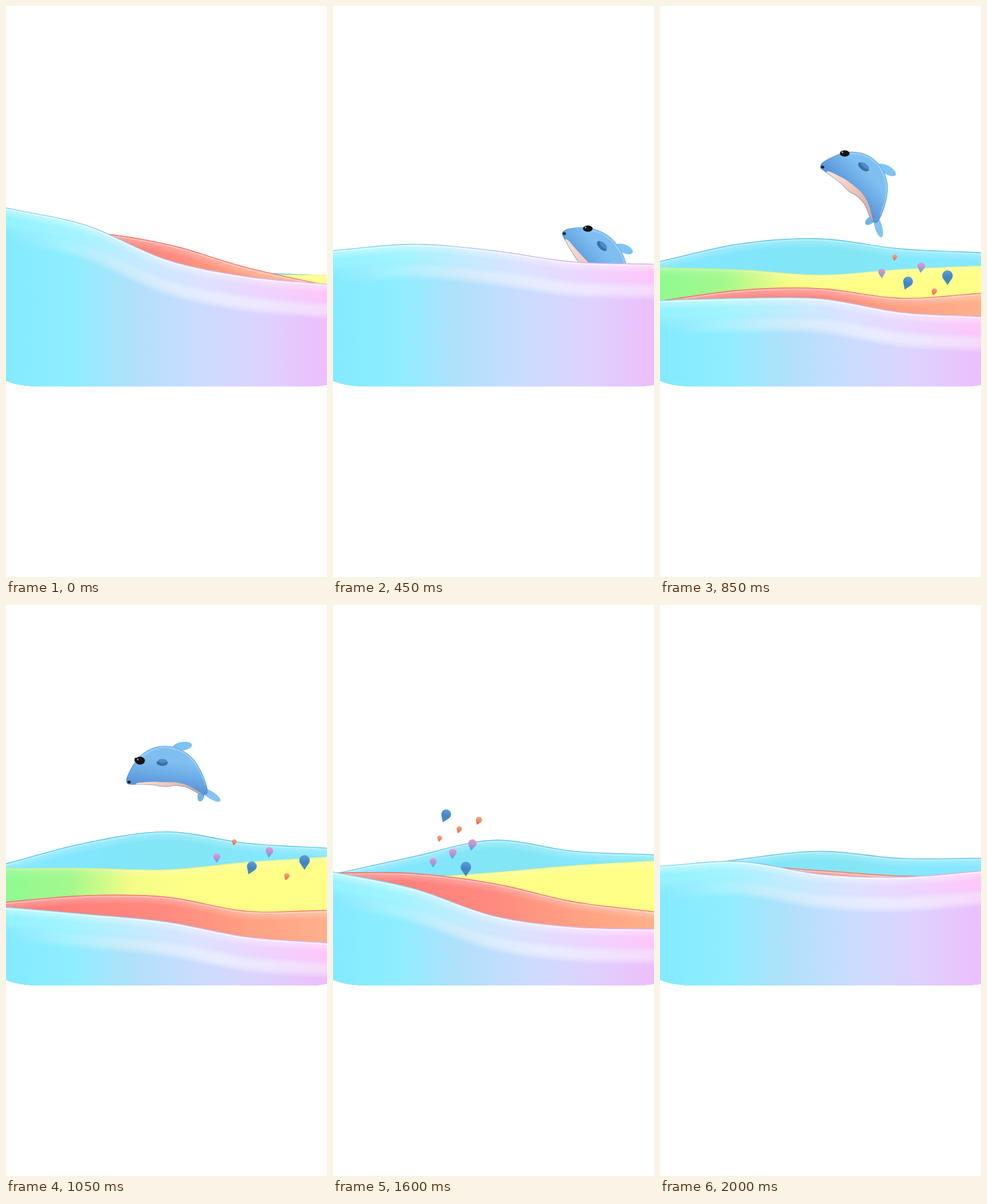
An HTML page with a canvas that plays this animation: 561x998 px, repeating every 2.05 s.

```html
<!DOCTYPE html>
<html lang="en">
<head>
<meta charset="utf-8">
<title>Dolphin over rainbow waves</title>
<style>
html, body { margin: 0; width: 100%; height: 100%; overflow: hidden; background: #fff; }
canvas { display: block; }
</style>
</head>
<body>
<canvas id="stage" width="561" height="998"></canvas>
<script>
const ctx = document.getElementById('stage').getContext('2d');
const W = 561, LOOP = 2050, STEP = 50, TIDE = 1900;
const { PI, sin, cos, atan2, hypot } = Math;

const clamp = (v, lo, hi) => Math.max(lo, Math.min(hi, v));
const mix = (a, b, k) => a + (b - a) * k;
const fract = v => v - Math.floor(v);
const ease = (t, from, to) => {
  const k = clamp((t - from) / (to - from), 0, 1);
  return k * k * (3 - 2 * k);
};

// Evenly spaced colours from one point to another.
function gradient(x0, y0, x1, y1, colors) {
  const g = ctx.createLinearGradient(x0, y0, x1, y1);
  colors.forEach((color, i) => g.addColorStop(i / (colors.length - 1), color));
  return g;
}
const across = (...colors) => gradient(0, 0, W, 0, colors);

// Smooth path through points.
function curve(pts, closed) {
  const path = new Path2D(), n = pts.length;
  const beyond = (p, q) => [2 * p[0] - q[0], 2 * p[1] - q[1]];
  const at = i => {
    if (closed) return pts[(i + n) % n];
    if (i < 0) return beyond(pts[0], pts[1]);
    return i < n ? pts[i] : beyond(pts[n - 1], pts[n - 2]);
  };
  path.moveTo(...pts[0]);
  for (let i = 0; i < (closed ? n : n - 1); i++) {
    const p = at(i - 1), a = at(i), b = at(i + 1), q = at(i + 2);
    path.bezierCurveTo(
      a[0] + (b[0] - p[0]) / 6, a[1] + (b[1] - p[1]) / 6,
      b[0] - (q[0] - a[0]) / 6, b[1] - (q[1] - a[1]) / 6, ...b);
  }
  return path;
}

// Each wave bobs at its left, middle and right: mean height, drift per second,
// swing and the time of its lowest crest. The bend adds a fixed S shape.
const cyan = {
  left: [455, 2, -12, 720], middle: [425, -8, -22, 1150], right: [456, -15, -16, 1050], bend: -6,
  base: across('#84e8ff', '#82e6ff', '#82e6f8', '#84e6f4', '#84e8ff', '#86e8ff'),
  edge: '#58b4e0', shine: .35
};
const yellow = {
  left: [463, 2, -8, 760], middle: [468, 4, -14, 1290], right: [458, 0, -24, 1270], bend: 2,
  base: across('#90fa92', '#a4f88c', '#f6fd86', '#ffff88', '#ffff88', '#ffff88'),
  edge: '#e4f080', shine: .2
};
const red = {
  left: [440, 35.5, 45.7, 914], middle: [447, 26, 36, 1104], right: [503, 0, 51, 1334], bend: -9,
  base: across('#ff7c78', '#ff827c', '#ff8a80', '#ffa082', '#ffb08a'),
  edge: '#e8705c', shine: .4
};
const front = {
  left: [414, 51, 62, 975], middle: [478, 22, 68, 1261], right: [527, 0, 84, 1270], bend: -8,
  lit: across('#94f2ff', '#a2f4ff', '#c2ecff', '#dee2ff', '#eed4ff', '#ffc6fa'),
  base: across('#82e8ff', '#8cecff', '#b0def8', '#c9daff', '#dcd0ff', '#ebbcff'),
  glow: across('#ffffff00', '#ffffff18', '#ffffff28', '#ffffff20'),
  edge: across('#7cc8f0', '#8cb4ec', '#c4a4e4', '#d4a0e0'), shine: .6
};

function crestPoint(wave, x, t) {
  const [a, b] = x < .5 ? [wave.left, wave.middle] : [wave.middle, wave.right];
  const [mean, drift, swing, peak] = a.map((v, i) => mix(v, b[i], x < .5 ? 2 * x : 2 * x - 1));
  const y = mean + drift * t / 1000 + swing * cos(2 * PI * (t - peak) / TIDE);
  return [x * W, y + wave.bend * sin(2 * PI * x)];
}

function strokeAt(path, dy, color, width, alpha = 1) {
  ctx.save();
  ctx.translate(0, dy);
  ctx.globalAlpha = alpha;
  ctx.strokeStyle = color;
  ctx.lineWidth = width;
  ctx.stroke(path);
  ctx.restore();
}

function drawWave(wave, t) {
  const crest = curve([0, .25, .5, .75, 1].map(x => crestPoint(wave, x, t)));
  const body = new Path2D(crest);
  body.lineTo(W, 700);
  body.lineTo(0, 700);
  body.closePath();
  ctx.save();
  ctx.clip(body);
  ctx.fillStyle = wave.lit || wave.base;
  ctx.fill(body);
  if (wave.lit) {
    // Fade from the lit lip into the body colour.
    ctx.fillStyle = wave.base;
    for (let dy = 30; dy < 76; dy += 3) {
      ctx.save();
      ctx.translate(0, dy);
      ctx.globalAlpha = .2;
      ctx.fill(body);
      ctx.restore();
    }
    for (let width = 30; width > 6; width -= 6) strokeAt(crest, 47, wave.glow, width);
  }
  for (let width = 20; width > 4; width -= 5) strokeAt(crest, 5, '#fff', width, wave.shine * .13);
  strokeAt(crest, 3, '#fff', 2.5, wave.shine * .8);
  strokeAt(crest, 0, wave.edge, 2);
  ctx.restore();
}

function blob(color, [x, y], rx, ry, turn = 0) {
  ctx.fillStyle = color;
  ctx.beginPath();
  ctx.ellipse(x, y, rx, ry, turn, 0, 7);
  ctx.fill();
}

// Rounded fin from a to b.
function lobe(color, a, b, width) {
  const dx = b[0] - a[0], dy = b[1] - a[1];
  blob(color, [a[0] + dx / 2, a[1] + dy / 2], hypot(dx, dy) / 2, width, atan2(dy, dx));
}

// Maps (s, v) to the stage: s runs from snout to tail along a bent spine,
// v from belly (-1) to back (1).
function dolphinSpace(t) {
  const u = t - 650;
  const x = 388 - .314 * u + .000117 * u * u;
  const y = 386 - .347 * u + .000127 * u * u + 8e-7 * u ** 3;
  const heading = (-132 - 92 * ease(t, 800, 1350)) * PI / 180;
  const bend = 20 + 20 * sin(PI * clamp((t - 600) / 650, 0, 1));
  const length = 176 - 1.15 * bend;
  return (s, v) => {
    const rise = 4 * bend * (1 - 2 * s), norm = hypot(length, rise);
    const half = 6 + 30 * sin(PI * clamp(s, 0, 1) ** .85);
    const along = (s - .5) * length - v * half * rise / norm;
    const up = 4 * bend * s * (1 - s) + v * half * length / norm;
    return [
      x - along * cos(heading) - up * sin(heading),
      y - along * sin(heading) + up * cos(heading)];
  };
}

function drawDolphin(t) {
  if (t < 450 || t > 1450) return;
  const at = dolphinSpace(t), roll = ease(t, 850, 1250);
  const side = (v, from, to) => Array.from({ length: 7 }, (_, i) => at(mix(from, to, i / 6), v));
  const skin = gradient(...at(.5, 1), ...at(.5, -1), ['#7cbcf0', '#80c0f0', '#6eaee8', '#5c96d8']);

  lobe('#7cc4f2', at(.5, .95), at(.64, 1.55), 7.5);
  lobe('#72b4e8', at(.96, 0), at(1.04, -2.6), 6);
  lobe('#84c4f0', at(.96, 0), at(1.12, 2.6), 6.5);
  blob('#1c1c24', at(.16, 1.02), 5 * roll, 8 * roll);

  const body = curve([at(-.02, 0), ...side(1, .03, 1), ...side(-1, 1, .03)], true);
  ctx.fillStyle = skin;
  ctx.fill(body);
  ctx.save();
  ctx.clip(body);
  ctx.fillStyle = gradient(...at(.1, -1), ...at(1, -1), ['#f8dcd2', '#ecc0b2', '#d4a89c']);
  ctx.fill(curve([...side(-1.2, .05, 1), ...side(mix(-.62, -.92, roll), 1, .05)], true));
  strokeAt(curve(side(.92, .2, .95)), 0, '#b4e2ff', 4, .35);
  strokeAt(body, 0, '#4a86c4', 2, .5);
  ctx.restore();

  const flipper = mix(.45, 0, roll);
  lobe('#3d6ea8', at(.34, flipper), at(.47, flipper - .05), 5.5);
  lobe('#4f8bcc', at(.36, flipper + .08), at(.46, flipper + .03), 3.5);
  const eye = at(.19, mix(.93, .6, roll));
  blob('#141418', eye, 8.5, mix(5.5, 8.5, roll));
  blob('#ffffffb0', [eye[0] - 4, eye[1] - 2], 1.3, 1.6);
  blob('#20242c', at(0, -.1), 3, 2.5);
}

const inks = [
  ['#e49cd8', '#b890d4', '#40b4dc'],
  ['#ffa47c', '#f48464', '#d86450'],
  ['#5c9ce0', '#4484c4', '#3c94c0']
];
const splashes = [
  { at: 850, x: 445, y: 465, width: 115, height: 70, count: 6, seed: .5 },
  { at: 1600, x: 215, y: 418, width: 80, height: 108, count: 8, seed: .78 }
];

function drawSplash(splash, t) {
  const u = (t - splash.at) / 150;
  if (u < -1.2 || u > 2.6) return;
  const size = clamp(Math.min((u + 1.3) / 1.1, (2.6 - u) / 1.2), 0, 1);
  for (let i = 0; i < splash.count; i++) {
    const dx = splash.width * (i / (splash.count - 1) - .5);
    const dy = splash.height * (fract(i * .618 + splash.seed) - .5);
    const r = 3 + 6.5 * fract(i * .7 + .45);
    const lean = PI / 2 + .5 * fract(i * .4);
    const tip = [1.8 * r * cos(lean), 1.8 * r * sin(lean)];
    ctx.save();
    ctx.translate(splash.x + dx * (1 + .25 * u), splash.y + dy - 56 * u + 28 * u * u);
    ctx.scale(size, size);
    ctx.fillStyle = gradient(0, -r, ...tip, inks[i % 3]);
    ctx.beginPath();
    ctx.moveTo(...tip);
    ctx.arc(0, 0, r, lean + .9, lean - .9 + 2 * PI);
    ctx.closePath();
    ctx.fill();
    ctx.restore();
  }
}

const basin = new Path2D('M0 0H561V662Q548 665 528 665H58Q20 664 0 655Z');

function draw() {
  const t = Math.floor(performance.now() % LOOP / STEP) * STEP;
  ctx.fillStyle = '#fff';
  ctx.fillRect(0, 0, W, 998);
  ctx.save();
  ctx.clip(basin);
  drawWave(cyan, t);
  drawWave(yellow, t);
  drawDolphin(t);
  splashes.forEach(s => drawSplash(s, t));
  drawWave(red, t);
  drawWave(front, t);
  ctx.restore();
  requestAnimationFrame(draw);
}
draw();
</script>
</body>
</html>
```
